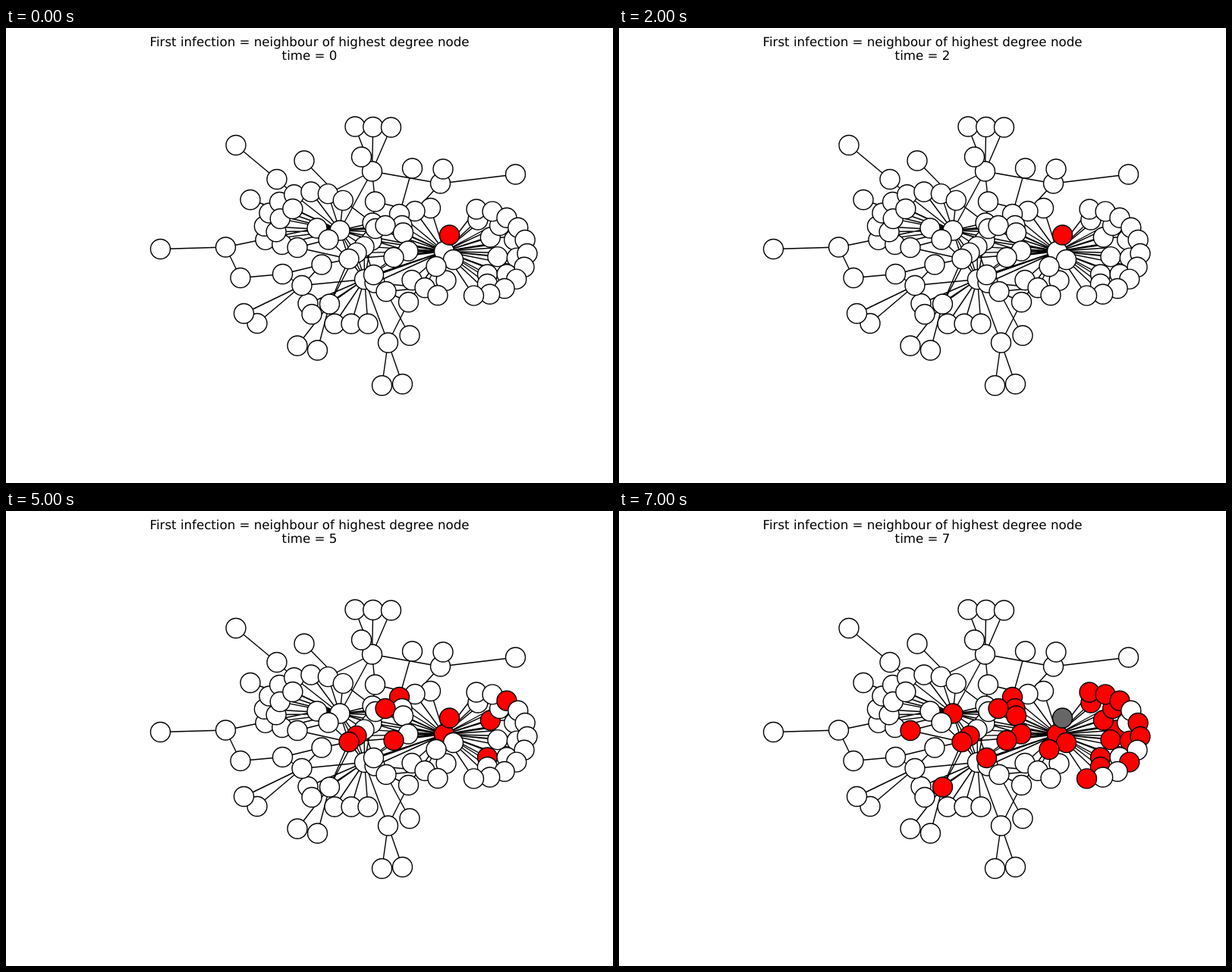
Animation, 800 px wide and 600 px high, one loop 8 s. Source, as an HTML page with a canvas:

```html
<!DOCTYPE html>
<html lang="en">
<head>
<meta charset="utf-8">
<style>
  html, body { margin: 0; height: 100%; overflow: hidden; background: #fff; }
  canvas { display: block; }
</style>
</head>
<body>
<canvas id="stage" width="800" height="600"></canvas>
<script>
const ctx = document.getElementById('stage').getContext('2d');
const nodes = [], links = [];

// Nodes stack in the order they are added; links always lie below them.
function add(x, y, ...neighbours) {
  const node = { x, y, infected: Infinity, recovered: Infinity };
  nodes.push(node);
  for (const other of neighbours) links.push([node, other]);
  return node;
}

function spread(count, pointAt, neighbours) {
  return Array.from({ length: count }, (_, i) => add(...pointAt(i / (count - 1)), ...neighbours));
}

const line = (count, x1, y1, x2, y2, ...neighbours) =>
  spread(count, t => [x1 + (x2 - x1) * t, y1 + (y2 - y1) * t], neighbours);

const arc = (count, cx, cy, rx, ry, from, to, ...neighbours) =>
  spread(count, t => {
    const angle = (from + (to - from) * t) * Math.PI / 180;
    return [cx + rx * Math.cos(angle), cy + ry * Math.sin(angle)];
  }, neighbours);

// Three hubs
const east = add(577.5, 294.5);
const west = add(440, 267, east);
const south = add(472.5, 331.5, east, west);

// Leaves fanning out from the eastern hub
const hidden = add(655, 289, east);
const inner = arc(3, 621, 299, 27, 30, -50, 60, east);
const middle = arc(6, 620, 296, 54, 43, -88, 74.5, east);
const outer = arc(11, 620, 296, 67, 57, -90, 93, east);
const seed = add(584.5, 273, east);
const near = add(589.5, 305.5, east);
add(580, 333, east);
const below = add(567, 314.5, east);
const [, slope] = line(3, 535, 332.5, 569, 352.5, east);
const [, ridge, ridgeEnd] = line(3, 559.5, 237.5, 518.5, 245.5, east);

// Leaves fanning out from the western hub
const rim = arc(8, 404, 267, 64, 51, 166, 309, west);
const fan = arc(4, 404, 267, 48, 34, 147, 237, west);
add(322, 226.5, west);
const gate = add(410, 264, west);

// Crowded core between the hubs
const top522 = add(522, 260.5, east, west);
const crown = add(483, 257, west, rim[7]);
const diagonal = line(4, 482, 280, 452, 304.5, east, west, south);
add(487, 264.5, east, west);
const coreTop = add(500, 260.5, east, west);
const coreRight = add(523.5, 270, east, west);
const coreEast = add(530, 294, east, west, south);
const coreMid = add(511, 302.5, east, south);
const knot = add(425, 279, west, diagonal[3]);
const bridge = add(384, 289.5, knot, diagonal[3]);

// Southern side
add(486, 336, south, east, slope);
const southTop = add(484.5, 325.5, south, east, diagonal[1]);
const shoulder = add(501, 347.5, south, slope);
line(2, 398, 363.5, 403, 377.5, south);
const branch = add(426.5, 364, south, diagonal[2], diagonal[3]);
line(3, 433, 390, 477, 390, south);
line(2, 384, 419, 410.5, 425, branch);
const fork = add(503.5, 415, south);
line(2, 495.5, 471.5, 522.5, 469.5, fork);
add(530.5, 361.5, east, shoulder, fork);
add(532, 405.5, shoulder);

// Long chain to the west
const joint = add(390, 339.5, south);
line(2, 331, 389.5, 313.5, 376.5, joint);
add(416, 312, joint, diagonal[3]);
const elbow = add(309, 329.5, add(364.5, 324.5, joint, nodes[nodes.length - 1]));
add(203.5, 291.5, add(289.5, 289, elbow, gate));

// Northern side
add(303, 154.5, add(357, 199.5, rim[4]));
add(393, 175, rim[7]);
const north = add(482.5, 189, rim[6], west);
line(3, 460, 130, 507.5, 131, north);
add(468.5, 170, north);
add(486.5, 229, north, crown, ridge);
add(535.5, 185, ridgeEnd);
const northEast = add(572.5, 205, north, ridge);
add(576, 186, northEast);
add(671.5, 193, northEast);

const outbreak = {
  0: [seed],
  3: [east],
  5: [ridgeEnd, coreTop, diagonal[2], diagonal[3], coreMid, inner[0], inner[2], outer[2]],
  6: [west, bridge, top522, near, hidden, inner[1], middle[0], middle[1],
      outer[1], outer[4], outer[7], outer[10]],
  7: [coreRight, coreEast, below, southTop, branch, middle[3], middle[5], outer[0], outer[5]]
};
for (const [time, group] of Object.entries(outbreak))
  for (const node of group) node.infected = +time;
seed.recovered = 7;

function draw(time) {
  ctx.fillStyle = '#fff';
  ctx.fillRect(0, 0, 800, 600);
  ctx.strokeStyle = '#000';
  ctx.lineWidth = 1.39;

  ctx.beginPath();
  for (const [a, b] of links) {
    ctx.moveTo(a.x, a.y);
    ctx.lineTo(b.x, b.y);
  }
  ctx.stroke();

  for (const node of nodes) {
    ctx.fillStyle = time >= node.recovered ? '#666' : time >= node.infected ? '#f00' : '#fff';
    ctx.beginPath();
    ctx.arc(node.x, node.y, 13, 0, 2 * Math.PI);
    ctx.fill();
    ctx.stroke();
  }

  ctx.fillStyle = '#000';
  ctx.font = '16.667px "DejaVu Sans", sans-serif';
  ctx.textAlign = 'center';
  ctx.textRendering = 'geometricPrecision';
  ctx.fillText('First infection = neighbour of highest degree node', 400, 24);
  ctx.fillText('time = ' + time, 400, 42);
}

function tick() {
  draw(Math.floor(performance.now() / 1000) % 8);
  requestAnimationFrame(tick);
}
tick();
</script>
</body>
</html>
```
